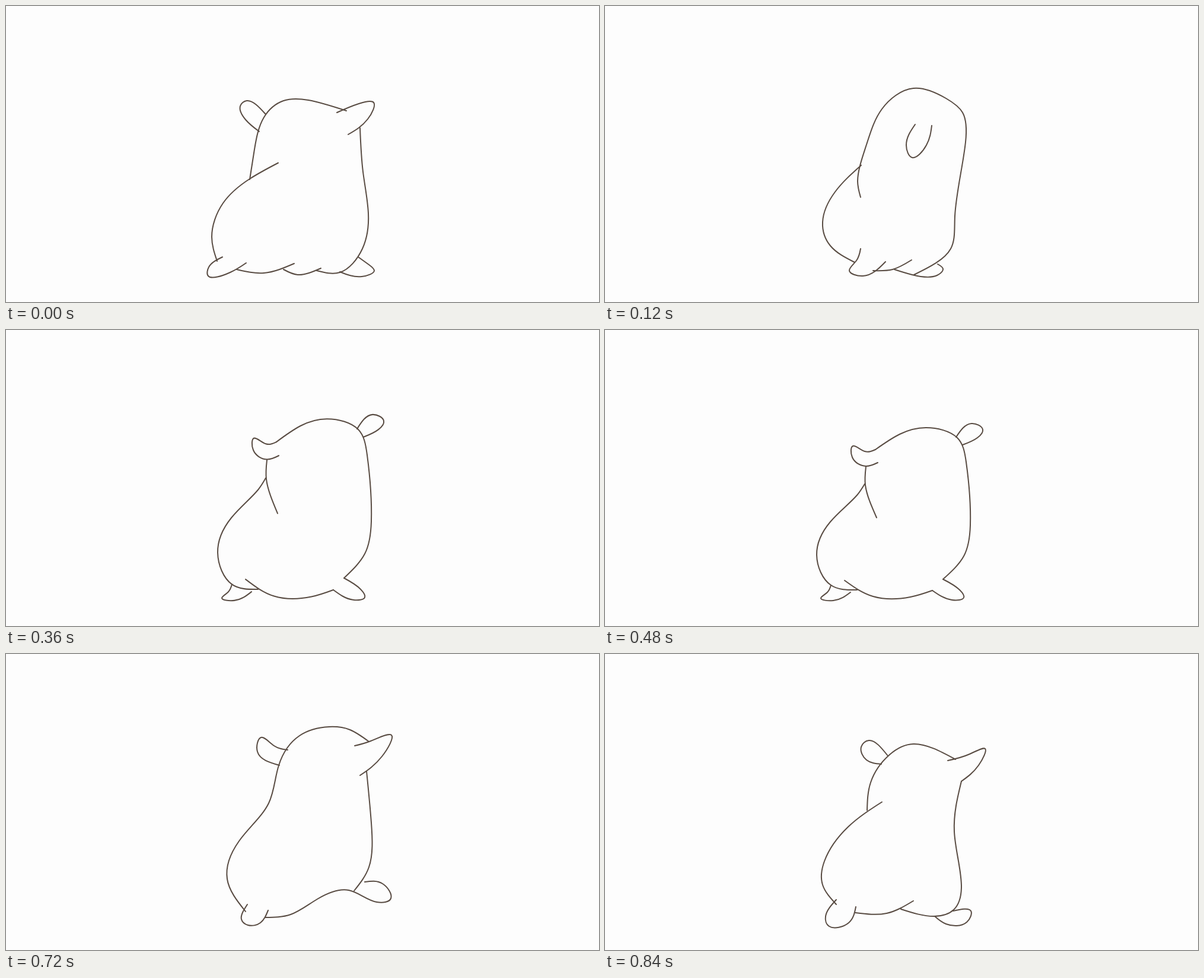
These frames come from a looping animation (1000 by 500 pixels, 0.96 s). An HTML page with a canvas:

```html
<!DOCTYPE html>
<html lang="en">
<head>
<meta charset="utf-8">
<title>Hopping creature</title>
<style>
  html, body { margin: 0; width: 100%; height: 100%; overflow: hidden; background: #fdfdfd; }
  canvas { display: block; }
</style>
</head>
<body>
<canvas id="stage" width="1000" height="500"></canvas>
<script>
const STEP = 120;
const ctx = document.getElementById('stage').getContext('2d');

// Slopes of a natural cubic spline through v with knot gaps h.
function slopes(v, h) {
  const last = v.length - 1, m = v.map(() => 0);
  const rate = i => (v[i + 1] - v[i]) / h[i];
  for (let pass = 0; pass < 30; pass++) {
    m[0] = (3 * rate(0) - m[1]) / 2;
    for (let i = 1; i < last; i++) {
      const a = h[i - 1], b = h[i];
      m[i] = (3 * (b * rate(i - 1) + a * rate(i)) - b * m[i - 1] - a * m[i + 1]) / (2 * (a + b));
    }
    m[last] = (3 * rate(last - 1) - m[last - 1]) / 2;
  }
  return m;
}

// One pen stroke: a smooth curve through x, y pairs.
function line(...xy) {
  const x = xy.filter((_, i) => i % 2 === 0), y = xy.filter((_, i) => i % 2);
  const h = x.slice(1).map((v, i) => Math.hypot(v - x[i], y[i + 1] - y[i]) ** 0.7);
  const mx = slopes(x, h), my = slopes(y, h);
  ctx.beginPath();
  ctx.moveTo(x[0], y[0]);
  h.forEach((gap, i) => {
    const k = gap / 3, j = i + 1;
    ctx.bezierCurveTo(x[i] + mx[i] * k, y[i] + my[i] * k, x[j] - mx[j] * k, y[j] - my[j] * k, x[j], y[j]);
  });
  ctx.stroke();
}

function squatRight() {
  line(438, 183, 406, 160, 395, 169, 404, 192, 427, 212);
  line(411, 293, 419, 242, 435, 188, 468, 160, 510, 159, 574, 177);
  line(558, 180, 595, 165, 620, 163, 610, 191, 577, 217);
  line(597, 206, 602, 280, 611, 350, 601, 410, 563, 450, 524, 447);
  line(459, 265, 411, 292, 366, 333, 347, 390, 356, 431);
  line(365, 424, 342, 441, 341, 456, 378, 450, 405, 434);
  line(389, 445, 435, 451, 486, 435);
  line(468, 445, 492, 454, 531, 443);
  line(594, 424, 612, 437, 621, 447, 600, 457, 563, 449);
}

function stretch() {
  line(431, 323, 426, 296, 441, 234, 467, 174, 520, 139, 575, 156, 603, 180, 608, 230, 590, 355, 583, 410, 521, 454);
  line(432, 269, 388, 314, 367, 365, 380, 405, 421, 433);
  line(431, 410, 424, 430, 412, 447, 435, 456, 473, 432);
  line(452, 447, 485, 445, 517, 429);
  line(488, 445, 518, 454, 560, 455, 570, 444, 561, 436);
  line(523, 200, 508, 235, 518, 256, 542, 235, 551, 202);
}

function highLeft() {
  line(457, 161, 425, 142, 406, 149, 429, 176, 461, 178);
  line(454, 158, 475, 132, 525, 124, 580, 126, 607, 150);
  line(607, 150, 611, 220, 605, 338, 593, 400);
  line(607, 149, 639, 125, 654, 136, 640, 157, 610, 178);
  line(452, 180, 438, 265, 446, 306, 465, 333);
  line(439, 262, 388, 313, 366, 380, 386, 430, 440, 442, 473, 432);
  line(387, 431, 385, 447, 400, 458, 416, 452, 410, 439);
  line(459, 423, 510, 442, 577, 422);
  line(553, 417, 575, 420, 618, 439, 623, 415, 586, 401);
}

function squatLeft() {
  line(456, 202, 438, 205, 418, 196, 417, 215, 440, 230, 460, 224);
  line(456, 202, 497, 176, 541, 165, 594, 182, 609, 223, 616, 330, 605, 382, 570, 421);
  line(592, 181, 618, 158, 637, 168, 628, 182, 603, 194);
  line(440, 231, 439, 262, 458, 317);
  line(438, 260, 425, 279, 380, 324, 357, 380, 381, 431, 425, 439);
  line(381, 431, 375, 443, 364, 453, 385, 457, 414, 443);
  line(404, 423, 452, 450, 515, 451, 552, 440);
  line(570, 421, 598, 439, 605, 452, 585, 456, 552, 440);
}

function highRight() {
  line(475, 162, 452, 155, 430, 141, 424, 165, 461, 188);
  line(612, 148, 580, 128, 545, 123, 495, 138, 460, 188, 443, 252, 393, 316, 373, 380, 404, 435);
  line(588, 155, 615, 147, 650, 137, 634, 173, 597, 205);
  line(608, 198, 616, 285, 612, 360, 587, 400);
  line(437, 445, 480, 440, 525, 414, 578, 399, 625, 419, 649, 413, 635, 388, 605, 385);
  line(407, 423, 397, 448, 408, 458, 429, 454, 442, 433);
}

function dropRight() {
  line(477, 172, 445, 146, 432, 157, 441, 179, 466, 186);
  line(442, 264, 448, 217, 480, 170, 520, 152, 591, 178);
  line(578, 180, 615, 169, 641, 160, 630, 188, 601, 215);
  line(601, 215, 589, 300, 601, 395, 588, 432, 555, 443, 499, 431);
  line(467, 250, 410, 292, 370, 350, 367, 390, 390, 423);
  line(390, 415, 372, 443, 378, 460, 411, 454, 423, 427);
  line(422, 437, 475, 438, 520, 417);
  line(587, 434, 617, 434, 610, 453, 575, 456, 556, 443);
}

// The drop to the left is the squat, slightly taller above the ground.
function dropLeft() {
  ctx.transform(1, 0, 0, 1.05, 0, -23);
  squatLeft();
}

function stretchBack() {
  ctx.translate(7, 0);
  stretch();
}

const poses = [squatRight, stretch, highLeft, dropLeft, squatLeft, stretchBack, highRight, dropRight];
const start = performance.now();

function render(now) {
  const i = Math.floor(Math.max(0, now - start) / STEP) % poses.length;
  ctx.resetTransform();
  ctx.fillStyle = '#fdfdfd';
  ctx.fillRect(0, 0, 1000, 500);
  ctx.strokeStyle = '#594c43';
  ctx.lineWidth = 2;
  ctx.lineCap = ctx.lineJoin = 'round';
  poses[i]();
  requestAnimationFrame(render);
}
render(start);
</script>
</body>
</html>
```
